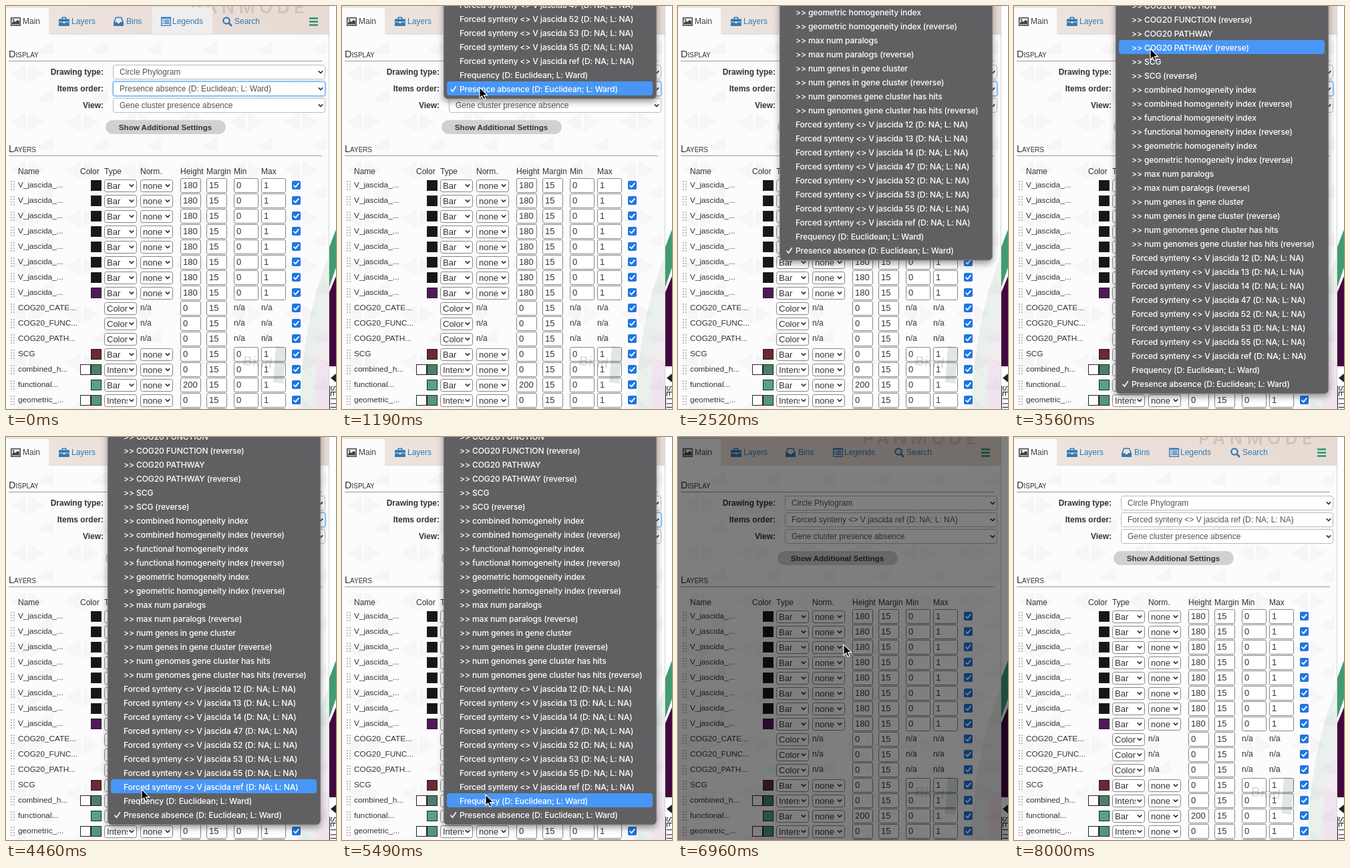
An HTML page for the animation above (8.6 s loop, 494x604 px).

```html
<!DOCTYPE html>
<html lang="en">
<head>
<meta charset="utf-8">
<title>Items order</title>
<style>
  html, body { margin: 0; width: 100%; height: 100%; overflow: hidden; background: #fff; }
  svg { display: block; width: 494px; height: 604px; font: 12px "Liberation Sans", Arial, sans-serif; }
  text { white-space: pre; }
  .bold { font-weight: 700; fill: #333; }
  .heading { font-size: 14.5px; font-variant: small-caps; fill: #333; }
  .field { font-size: 13px; fill: #333; }
  .menu { font: 500 12.1px Inter, Roboto, sans-serif; letter-spacing: -.135px; fill: #fff; }
  #ghost { mix-blend-mode: multiply; }
</style>
</head>
<body>
<svg id="stage" viewBox="0 0 494 604" xmlns="http://www.w3.org/2000/svg">
  <defs>
    <linearGradient id="bar">
      <stop offset="0" stop-color="#eee5df"/>
      <stop offset=".5" stop-color="#eadfd8"/>
      <stop offset="1" stop-color="#e6dbd2"/>
    </linearGradient>
    <pattern id="triangles" width="82" height="72" patternUnits="userSpaceOnUse">
      <path d="M6 30 30 16V44ZM34 16 58 30 34 44ZM47 66 71 52V72H57Z" fill="#f6f6f6"/>
    </pattern>
    <clipPath id="panelClip"><path d="M0 42H483V604H0Z"/></clipPath>
    <clipPath id="typeClip"><path d="M148 240H182V604H148Z"/></clipPath>
    <filter id="shadow" x="-10%" y="-10%" width="120%" height="120%">
      <feDropShadow dx="0" dy="4" stdDeviation="5" flood-opacity=".4"/>
    </filter>
  </defs>

  <rect width="494" height="604" fill="#fff"/>
  <g id="chart">
    <path d="M484 361 494 335V392L484 421Z" fill="#409b73"/>
    <path d="M484 429 494 405V540H484Z" fill="#430740"/>
    <path d="M494 551V564L486 557.5Z" fill="#222"/>
    <text transform="translate(486 569) rotate(90)" fill="#222" text-decoration="underline">SETTINGS</text>
  </g>

  <rect width="483" height="604" fill="#fcfcfc"/>
  <rect y="42" width="483" height="562" fill="url(#triangles)"/>
  <path d="M483.5 0V604" stroke="#d5d5d5"/>

  <rect width="483" height="42" fill="url(#bar)"/>
  <text x="276" y="11" font-family="Inter, sans-serif" font-size="26" font-weight="600" letter-spacing="6.5" fill="#cfc4bb">PANMODE</text>
  <path id="hover" d="M219 42V6Q219 2 223 2H305Q309 2 309 6V42Z" fill="#eee"/>
  <path d="M0 43V3H60Q64 3 64 7V43Z" fill="#fcfcfc"/>
  <path d="M64 42.5H483" stroke="#ddd"/>

  <g fill="#444">
    <path d="M7 17H22V30H7ZM8.5 18.5V28.5H20.5V18.5Z" fill-rule="evenodd"/>
    <path d="M9 27.5V25L12 22 14 24 17.5 20.5 20 23V27.5Z"/>
    <circle cx="11" cy="20.8" r="1.4"/>
  </g>
  <g fill="#337ab7">
    <path d="M79 19.5H83.5V16.5H90.5V19.5H95V23.5H79ZM85 18V19.5H89V18ZM79 24.5H85.5V26H88.5V24.5H95V30H79Z" fill-rule="evenodd"/>
    <path d="M164 16.5H173L176 24V30H161V24ZM165 18 162.8 24H166L167 26H170L171 24H174.2L172 18Z" fill-rule="evenodd"/>
    <path d="M232 16.5H247V30H232ZM233.3 19V28.7H245.7V19ZM234.5 20.5H236V22H234.5ZM237 20.5H244.5V22H237ZM234.5 23H236V24.5H234.5ZM237 23H244.5V24.5H237ZM234.5 25.5H236V27H234.5ZM237 25.5H244.5V27H237Z" fill-rule="evenodd"/>
    <circle cx="330" cy="22" r="4.7" fill="none" stroke="#337ab7" stroke-width="2.2"/>
    <path d="M333.5 25.5 338 30" stroke="#337ab7" stroke-width="2.8"/>
    <text x="98" y="27">Layers</text>
    <text x="180" y="27">Bins</text>
    <text x="249" y="27">Legends</text>
    <text x="342" y="27">Search</text>
  </g>
  <text x="25" y="27" fill="#444">Main</text>
  <path d="M454 18.5H467M454 23.5H467M454 28.5H467" stroke="#2b9275" stroke-width="2.4"/>

  <text class="heading" x="4" y="77">Display</text>
  <text class="heading" x="4" y="219">Layers</text>
  <path d="M4 82.5H473M4 224.5H473" stroke="#999"/>
  <g id="settings"></g>
  <rect x="149" y="171" width="180" height="21" rx="10.5" fill="#d1d1d1"/>
  <text class="bold" x="238.5" y="186" font-size="11.6" text-anchor="middle">Show Additional Settings</text>

  <g id="layers"></g>
  <g id="ghost" clip-path="url(#panelClip)">
    <path d="M494 350Q446 450 438 604H462Q464 510 494 420Z" fill="#edf4f0"/>
    <path d="M494 425Q468 480 464 526L494 538Z" fill="#f4f1f4"/>
    <path d="M464 526 494 538V604H462Z" fill="#f3e8f1"/>
    <path d="M404 510 420 512 415 566 400 564Z" fill="#dfe7e3"/>
    <path d="M436 515 483 535" stroke="#f0e3ee"/>
    <text transform="translate(354 538) rotate(6)" font-size="20" font-weight="700" fill="#dfe2e1">Bind</text>
  </g>
  <rect id="dim" width="494" height="604"/>
  <g id="popup">
    <rect id="popupBox" x="152.5" y="-40" width="318" rx="6" fill="#606163" stroke="#7b7c7e" filter="url(#shadow)"/>
    <rect id="highlight" x="157" width="308" height="21" rx="4" fill="#4897f6"/>
    <g id="items"></g>
  </g>
  <path id="cursor" d="M0 0V16L3.7 12.6 6 18 8.7 16.9 6.4 11.6H11.6Z" fill="#000" stroke="#fff" stroke-width="1.1"/>
</svg>
<script>
const LOOP = 8600, TICKS = 58, ROW = 21;
const $ = id => document.getElementById(id);

function add(parent, tag, attrs, content) {
  const node = document.createElementNS('http://www.w3.org/2000/svg', tag);
  for (const key in attrs) node.setAttribute(key, attrs[key]);
  if (content !== undefined) node.textContent = content;
  return parent.appendChild(node);
}
const label = (parent, x, y, content, attrs = {}) =>
  add(parent, 'text', { x, y, fill: '#333', ...attrs }, content);
const box = (parent, x, y, width, height, attrs = {}) =>
  add(parent, 'rect', { x, y, width, height, fill: '#fff', stroke: '#858585', ...attrs });
const chevron = (parent, x, y) =>
  add(parent, 'path', { d: `M${x - 3.2} ${y - 1.6}l3.2 3.2 3.2-3.2`, fill: 'none', stroke: '#333', 'stroke-width': 1.7 });

// Display settings
const selects = [
  ['Drawing type:', 'Circle Phylogram'],
  ['Items order:', ''],
  ['View:', 'Gene cluster presence absence'],
].map(([name, value], i) => {
  const g = $('settings'), y = 99 + 25 * i;
  label(g, 146, y + 4, name, { class: 'bold', 'text-anchor': 'end' });
  const glow = box(g, 159.5, y - 11.5, 319, 23, { rx: 4, fill: 'none', stroke: '#b5d8f7', 'stroke-width': 2, opacity: 0 });
  const frame = box(g, 160.5, y - 10.5, 317, 21, { rx: 3, stroke: '#bbb' });
  const text = label(g, 170, y + 4, value, { fill: '#555' });
  chevron(g, 471, y);
  return { glow, frame, text };
});
const order = selects[1];

// Layer table
const layers = $('layers');
[['Name', 18], ['Color', 111], ['Type', 147], ['Norm.', 201], ['Height', 261], ['Margin', 300], ['Min', 341], ['Max', 382]]
  .forEach(([name, x]) => label(layers, x, 252, name));

function dropdown(x, y, value, attrs) {
  box(layers, x + .5, y - 7.5, 48, 18, { rx: 3 });
  label(layers, x + 4, y + 5.5, value, { class: 'field', ...attrs });
  chevron(layers, x + 41, y + 1);
}
function input(x, y, width, value) {
  box(layers, x + .5, y - 9.5, width, 21, { rx: 2 });
  label(layers, x + 4, y + 5, value, { class: 'field' });
}
function swatch(x, y, fill) {
  box(layers, x + .5, y - 6.5, 15, 15, { fill, stroke: '#222' });
}
function layerRow({ name, type = 'Bar', color, start, height = 0 }, i) {
  const y = 268 + 23 * i, plain = !color;
  for (let k = 0; k < 8; k++)
    add(layers, 'circle', { cx: 8 + 4 * (k % 2), cy: y - 5 + 4 * (k >> 1), r: 1.1, fill: '#aaa' });
  label(layers, 18, y + 4, name, { 'font-size': 11.8 });
  if (start) swatch(111, y, start);
  if (color) swatch(127, y, color);
  dropdown(147, y, type, { 'clip-path': 'url(#typeClip)' });
  if (plain) label(layers, 201, y + 4, 'n/a'); else dropdown(201, y, 'none');
  input(261, y, 30, height);
  input(300, y, 30, 15);
  [[341, 0], [382, 1]].forEach(([x, value]) =>
    plain ? label(layers, x, y + 4, 'n/a') : input(x, y, 36, value));
  box(layers, 428, y - 6, 13, 13, { rx: 2, fill: '#1f76e3', stroke: 'none' });
  add(layers, 'path', { d: `M430.7 ${y + .6}l2.7 2.7 5-6`, fill: 'none', stroke: '#fff', 'stroke-width': 1.8 });
}
[
  ...Array.from({ length: 8 }, (_, i) => ({ name: 'V_jascida_...', color: i < 7 ? '#17171a' : '#54165c', height: 180 })),
  ...['CATE', 'FUNC', 'PATH'].map(s => ({ name: `COG20_${s}...`, type: 'Color' })),
  { name: 'SCG', color: '#6a2a30' },
  { name: 'combined_h...', type: 'Intensity', start: '#fff', color: '#4b7f6b' },
  { name: 'functional...', color: '#51a584', height: 200 },
  { name: 'geometric_...', type: 'Intensity', start: '#fff', color: '#52967d' },
  { name: '', type: '', color: '#52967d' },
].forEach(layerRow);

// Popup entries, listed from the bottom upwards
const synteny = id => `Forced synteny <> V jascida ${id} (D: NA; L: NA)`;
const chosen = synteny('ref'), initial = 'Presence absence (D: Euclidean; L: Ward)';
const sortKeys = ['num genomes gene cluster has hits', 'num genes in gene cluster', 'max num paralogs',
  'geometric homogeneity index', 'functional homogeneity index', 'combined homogeneity index',
  'SCG', 'COG20 PATHWAY', 'COG20 FUNCTION'];
[
  initial, 'Frequency (D: Euclidean; L: Ward)', chosen,
  ...[55, 53, 52, 47, 14, 13, 12].map(synteny),
  ...sortKeys.flatMap(key => [`>> ${key} (reverse)`, `>> ${key}`]),
].forEach((name, i) => label($('items'), 176, 4.5 - ROW * i, name, { class: 'menu', fill: '#fff' }));
add($('items'), 'path', { d: 'M162.5 .8l3 3.4 5.2-8', fill: 'none', stroke: '#fff', 'stroke-width': 1.6 });

// Timelines: [tick, ...values], each held until the next entry
const cursorPath = [
  [0], [1, 262, 3], [2, 228, 72], [3, 186, 146], [4, 172, 180], [5, 192, 146], [6, 206, 122], [11],
  [24, 204, 64], [25, 204, 110], [26, 204, 190], [27, 203, 300], [28, 203, 420], [29, 203, 505],
  [30, 203, 528], [31, 203, 536], [32, 204, 533], [33, 206, 520], [34, 207, 506], [35, 209, 512],
  [36, 212, 528], [37, 215, 536], [38, 219, 528], [39, 222, 517], [44, 227, 470], [45, 238, 380],
  [46, 246, 322], [47, 248, 311], [50, 318, 470], [51, 301, 510], [53, 365, 560], [54],
];
const lastItemY = [
  [0, 124], [11, 129], [12, 145], [13, 170], [14, 203], [15, 247], [16, 302], [17, 366],
  [18, 431], [19, 490], [20, 540], [21, 566],
];
const dimming = [[0, 0], [46, .5], [48, .25], [49, 0]];
const held = (track, tick) => track.filter(key => key[0] <= tick).pop().slice(1);
const show = (node, on) => node.setAttribute('visibility', on ? 'visible' : 'hidden');

function render(time) {
  // the lead absorbs the rounding of frame times to 10 ms
  const tick = Math.min(TICKS - 1, Math.floor((time % LOOP + 10) * TICKS / LOOP));
  const [x, y] = held(cursorPath, tick);
  const [bottom] = held(lastItemY, tick);
  const pointing = x !== undefined, open = tick >= 8 && tick < 43;

  show($('hover'), tick < 2);
  show($('cursor'), pointing);
  if (pointing) $('cursor').setAttribute('transform', `translate(${x} ${y})`);

  $('popup').setAttribute('display', open ? 'inline' : 'none');
  $('popup').setAttribute('opacity', tick === 42 ? .4 : 1);
  $('popupBox').setAttribute('height', bottom + 55);
  $('items').setAttribute('transform', `translate(0 ${bottom})`);
  $('highlight').setAttribute('opacity', pointing ? 1 : 0);
  if (pointing) $('highlight').setAttribute('y', bottom - 11 - ROW * Math.round((bottom - y) / ROW));

  const done = tick >= 43;
  order.text.textContent = done ? chosen : initial;
  order.frame.setAttribute('stroke', done ? '#bbb' : '#6fb1ee');
  order.glow.setAttribute('opacity', done ? 0 : 1);
  $('dim').setAttribute('opacity', held(dimming, tick)[0]);
}

let start;
function loop(now) {
  start ??= now;
  render(now - start);
  requestAnimationFrame(loop);
}
render(0);
requestAnimationFrame(loop);
</script>
</body>
</html>
```
